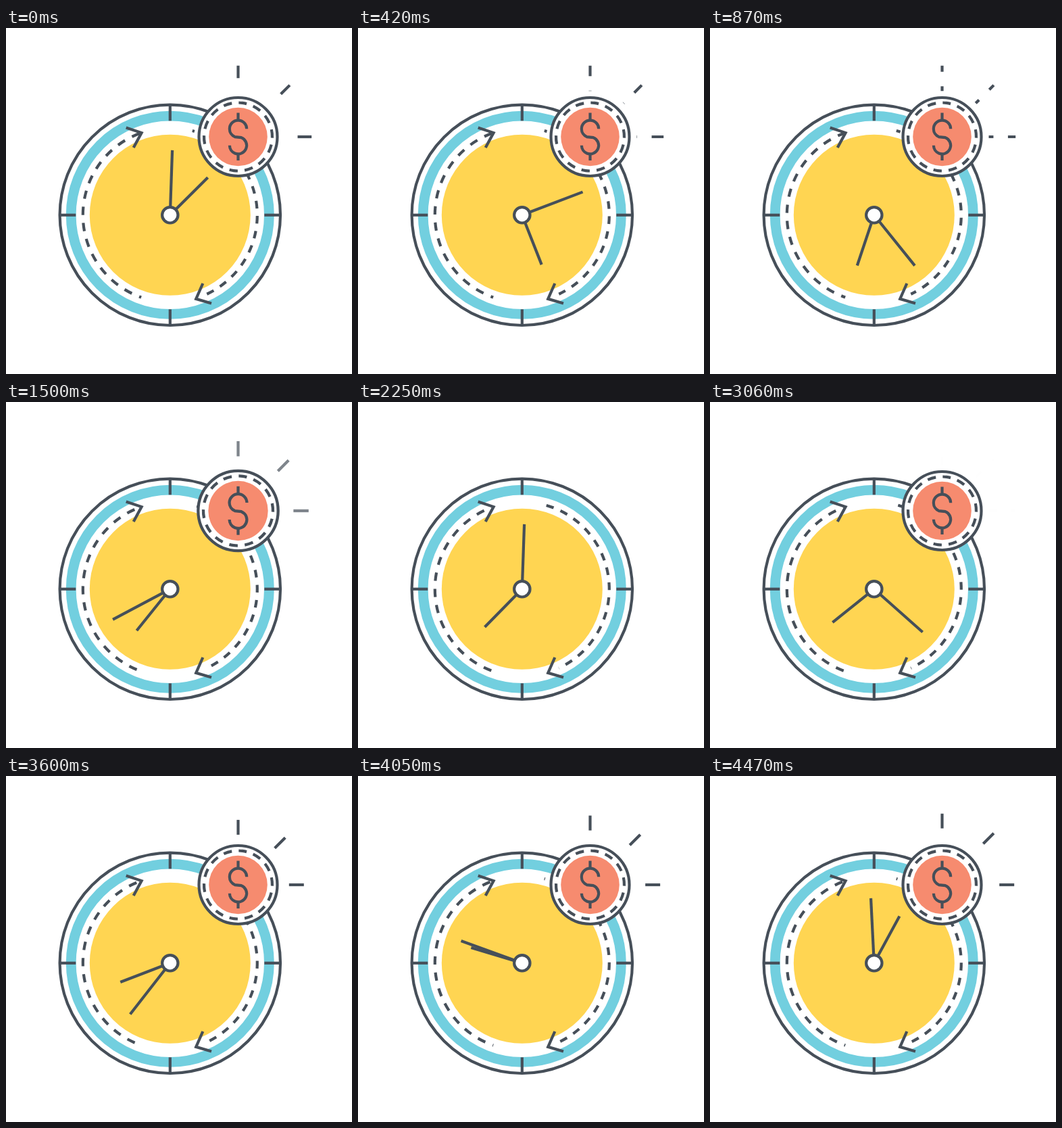
Recreate the animation shown at these times as an HTML page with a canvas. Size 512 px wide and 512 px high, loop 4.5 s.

```html
<!DOCTYPE html>
<html lang="en">
<head>
<meta charset="utf-8">
<title>Time is money</title>
<style>
  html, body { margin: 0; width: 100%; height: 100%; overflow: hidden; background: #fff; }
  canvas { display: block; width: 512px; height: 512px; }
</style>
</head>
<body>
<canvas id="stage" width="512" height="512"></canvas>
<script>
const ctx = document.getElementById('stage').getContext('2d');
const LOOP = 4500;
const INK = '#464f59', CYAN = '#72cfdf', YELLOW = '#ffd552', ORANGE = '#f68b6f';
const CLOCK = { x: 242.8, y: 276.8 };
const COIN = { x: 343.5, y: 161 };
const rad = deg => deg * Math.PI / 180;
const clamp01 = v => Math.max(0, Math.min(1, v));
const progress = (t, from, to) => clamp01((t - from) / (to - from));

function disc(x, y, r, fill, stroke) {
  ctx.beginPath();
  ctx.arc(x, y, r, 0, Math.PI * 2);
  if (fill) { ctx.fillStyle = fill; ctx.fill(); }
  if (stroke) { ctx.strokeStyle = stroke; ctx.stroke(); }
}

function line(...points) {
  ctx.beginPath();
  points.forEach(([x, y]) => ctx.lineTo(x, y));
  ctx.stroke();
}

function dashed(pattern, offset, draw) {
  ctx.setLineDash(pattern);
  ctx.lineDashOffset = offset;
  draw();
  ctx.setLineDash([]);
}

// Fast at both ends, nearly still in the middle
function swing(u) {
  const curve = (s, p1, p2) => 3 * p1 * s * (1 - s) ** 2 + 3 * p2 * s * s * (1 - s) + s ** 3;
  let lo = 0, hi = 1;
  for (let i = 0; i < 30; i++) {
    const mid = (lo + hi) / 2;
    if (curve(mid, 0.125, 0.875) < u) lo = mid; else hi = mid;
  }
  return curve(lo, 0.96, 0.04);
}

function hand(deg, length) {
  const a = rad(deg);
  line([CLOCK.x, CLOCK.y], [CLOCK.x + length * Math.sin(a), CLOCK.y - length * Math.cos(a)]);
}

// Dashes that travel clockwise, eleven steps per loop
function flowArc(startDeg, dashCount, t) {
  const r = 129, length = 315.7;
  const period = 312.2 / dashCount, dash = period * 0.51;
  const lead = 3.3 + 11 * period * t / LOOP;
  const from = rad(startDeg - 90);
  dashed([dash, period - dash], dash - lead, () => {
    ctx.beginPath();
    ctx.arc(CLOCK.x, CLOCK.y, r, from, from + length / r);
    ctx.stroke();
  });
}

function drawClock(t) {
  const { x, y } = CLOCK;
  ctx.lineWidth = 4.2;
  disc(x, y, 163.2, '#fff', INK);
  ctx.lineWidth = 14.8;
  disc(x, y, 146.6, null, CYAN);
  disc(x, y, 119, YELLOW);

  ctx.strokeStyle = INK;
  ctx.lineWidth = 4.2;
  for (const [dx, dy] of [[1, 0], [0, 1], [-1, 0], [0, -1]]) {
    line([x + dx * 139.5, y + dy * 139.5], [x + dx * 162, y + dy * 162]);
  }
  flowArc(14.8, 14, t);
  flowArc(199.3, 13, t);
  line([177.7, 147.4], [200.6, 155.1], [188.7, 177]);
  line([291.3, 378], [281.2, 400.8], [304, 407.5]);

  hand(1.8 + 720 * t / LOOP, 96);
  hand(44.5 + 360 * swing(t / LOOP), 78.8);
  disc(x, y, 11.7, '#fff', INK);
}

function coinScale(t) {
  if (t < 1740) return 1 + 0.1 * progress(t, 1440, 1740);
  if (t < 2250) return 1.1 * (1 - progress(t, 1740, 2190) ** 2);
  if (t < 2700) return 1.1 * (1 - (1 - progress(t, 2250, 2700)) ** 2);
  return 1.1 - 0.1 * progress(t, 2700, 3000);
}

function drawRays(t) {
  const alpha = t < LOOP / 2 ? 1 - progress(t, 1440, 1640) : progress(t, 3060, 3260);
  if (!alpha) return;
  const time = t < LOOP / 2 ? t : t - LOOP;
  const tail = 18.9 + 0.1108 * time;
  ctx.globalAlpha = alpha;
  for (const [deg, inner, outer] of [[-90, 67.8, 105.3], [-45, 70.3, 108], [0, 69, 108.7]]) {
    const a = rad(deg);
    const at = d => [d * Math.cos(a), d * Math.sin(a)];
    dashed([22, 21.5], -tail, () => line(at(inner), at(outer)));
  }
  ctx.globalAlpha = 1;
}

function drawDollar() {
  line([0, -35.5], [0, -24]);
  line([0, 25], [0, 35]);
  ctx.beginPath();
  ctx.arc(0, -11.7, 12.7, 0, rad(112), true);
  ctx.arc(0, 12.8, 12.6, rad(-68), rad(180));
  ctx.stroke();
}

function drawCoin(t) {
  const scale = coinScale(t);
  if (scale <= 0) return;
  ctx.save();
  ctx.translate(COIN.x, COIN.y);
  ctx.scale(scale, scale);
  ctx.lineWidth = 4.2;
  ctx.strokeStyle = INK;
  drawRays(t);
  disc(0, 0, 58, '#fff', INK);
  disc(0, 0, 43.3, ORANGE);

  const r = 50.5, step = 2 * Math.PI * r / 14, dash = 12.5;
  ctx.save();
  ctx.rotate(rad(7.4 - 90));
  dashed([dash, step - dash], dash / 2, () => disc(0, 0, r, null, INK));
  ctx.restore();

  drawDollar();
  ctx.restore();
}

function frame(now) {
  const t = now % LOOP;
  ctx.fillStyle = '#fff';
  ctx.fillRect(0, 0, 512, 512);
  drawClock(t);
  drawCoin(t);
}

const start = performance.now();
function tick() {
  frame(performance.now() - start);
  requestAnimationFrame(tick);
}
tick();
</script>
</body>
</html>
```
